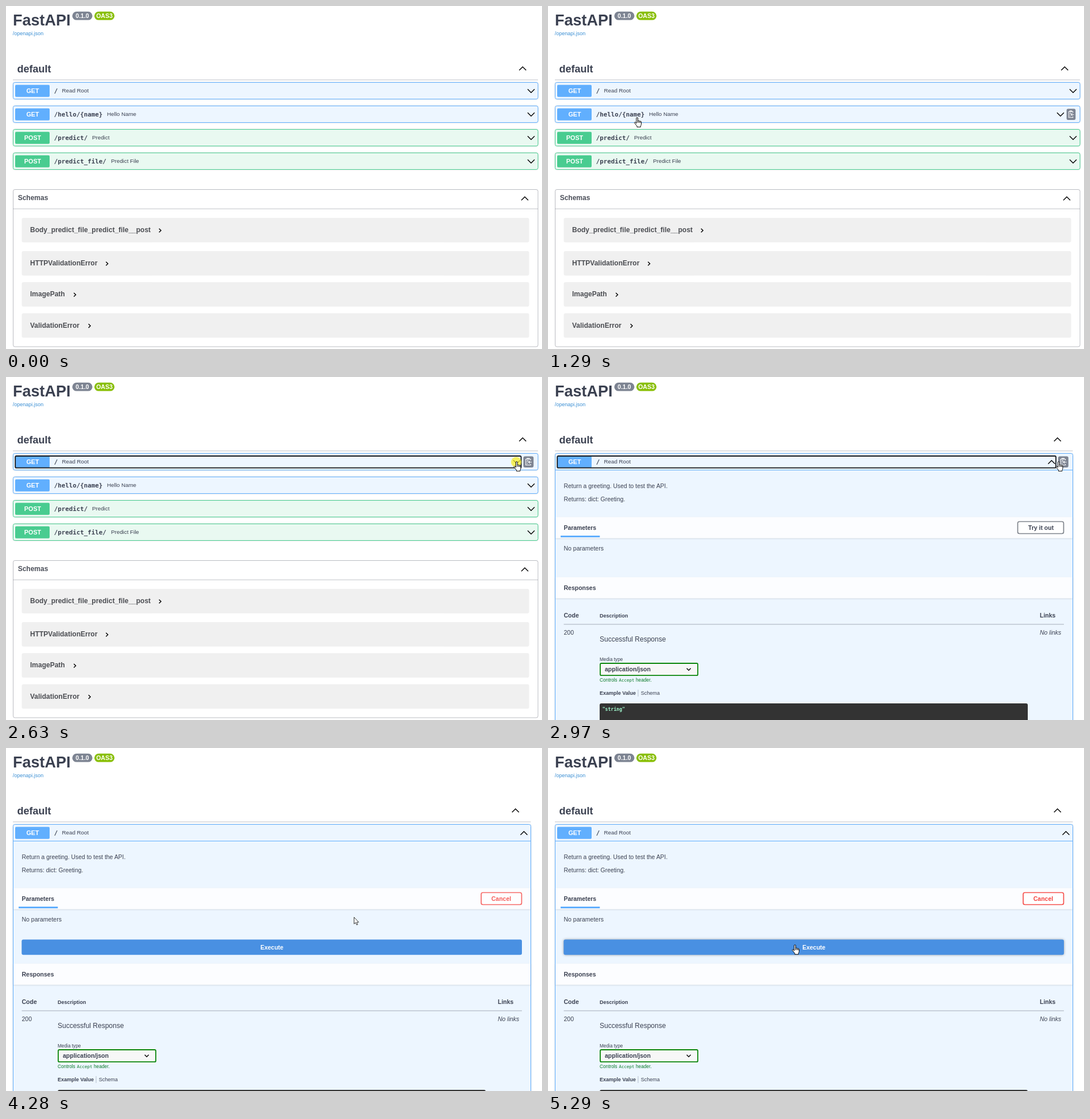
Animation, 934 px wide and 599 px high, one loop 8 s. Source, as an HTML page:

```html
<!DOCTYPE html>
<html lang="en">
<head>
<meta charset="utf-8">
<title>API docs</title>
<style>
html, body { margin: 0; width: 100%; height: 100%; overflow: hidden; background: #fff; }
svg { display: block; width: 934px; height: 599px; }
text { font-family: "Liberation Sans", Arial, sans-serif; font-size: 10.5px; fill: #3b4151; white-space: pre; }
.b { font-weight: 700; }
.mono { font-family: "DejaVu Sans Mono", monospace; }
.mid { text-anchor: middle; }
.white { fill: #fff; }
.green { fill: #0b7a28; }
.chev { fill: none; stroke: #000; stroke-width: 1.4; }
.rule { fill: #3b4151; opacity: .4; }
.line { fill: none; stroke: #3b4151; stroke-opacity: .35; }
.strip { fill: #fcfdff; filter: drop-shadow(0 1px 1px rgba(0, 0, 0, .12)); }
.btn { fill: #fff; stroke-width: 1.7; }
.shade { filter: drop-shadow(0 0 2px rgba(0, 0, 0, .35)); }
.row { filter: drop-shadow(0 0 1px rgba(0, 0, 0, .15)); }
</style>
</head>
<body>
<svg id="stage" viewBox="0 0 934 599"></svg>
<script>
const LOOP = 8000;
const BLUE = '#61affe', GREEN = '#49cc90', GREY = '#7d8492';

const text = (x, y, s, cls = '', size = 10.5, extra = '') =>
  `<text x="${x}" y="${y}" class="${cls}" style="font-size:${size}px;${extra}">${s}</text>`;
const rect = (x, y, w, h, fill, r = 0, extra = '') =>
  `<rect x="${x}" y="${y}" width="${w}" height="${h}" rx="${r}" fill="${fill}" ${extra}/>`;
const group = (id, body) => `<g id="${id}">${body}</g>`;
const chevron = (x, y, up, id = '') =>
  `<path ${id && `id="${id}"`} class="chev" transform="translate(${x} ${y})" d="${up ? 'M-6 3.2L0-2.8 6 3.2' : 'M-6-3.2L0 2.8 6-3.2'}"/>`;

const rows = [
  ['GET', '/', 'Read Root', 97.5],
  ['GET', '/hello/{name}', 'Hello Name', 176],
  ['POST', '/predict/', 'Predict', 150],
  ['POST', '/predict_file/', 'Predict File', 183]
];
const rowY = i => 133.5 + 41 * i;

function rowBox(i, w = 914.5, h = 29) {
  const get = rows[i][0] === 'GET';
  return rect(12.5, rowY(i), w, h, get ? '#edf6ff' : '#e9f9f1', 3,
    `stroke="${get ? BLUE : GREEN}" class="row"`);
}

function rowHead(i) {
  const [verb, path, label, x] = rows[i], y = rowY(i);
  return rect(16, y + 4.3, 60, 21, verb === 'GET' ? BLUE : GREEN, 2) +
    text(46.5, y + 18.6, verb, 'b mid white', 10.8) +
    text(83.7, y + 18.8, path, 'b mono', 10.8) +
    text(x, y + 17.6, label, '', 9.75);
}

const clip = id => `<g id="${id}">${rect(0, 0, 17.8, 19.5, GREY, 3)}
  <g fill="none" stroke="#fff" stroke-width="1.1">
  <path d="M12.6 7V5H4.2V15.3H12.6V13.6M6.3 5V3.6H10.5V5M6 7.6H9M6 9.8H7.6M6 12.6H7.6M14.6 10.2H9M11.2 8L9 10.2 11.2 12.4"/></g></g>`;

const schemas = [
  ['Body_predict_file_predict_file__post', 370, 268.5],
  ['HTTPValidationError', 428, 176],
  ['ImagePath', 482.3, 120],
  ['ValidationError', 536.6, 145.5]
];
const schema = ([name, y, x]) =>
  rect(27.5, y, 884, 42.7, '#f0f0f0', 3) +
  text(42, y + 25, name, 'b', 12, 'fill:#4b4d52') +
  `<path class="chev" d="M${x - 1.8} ${y + 18.7}l3.4 3.3-3.4 3.3"/>`;

const page =
  text(12, 34, 'FastAPI', 'b', 27) +
  rect(115.5, 9.8, 35, 14.8, GREY, 7.4) + text(133, 20.8, '0.1.0', 'b mid white') +
  rect(154, 9.8, 35, 14.8, '#89bf04', 7.4) + text(171.5, 20.8, 'OAS3', 'b mid white') +
  text(11.7, 51, '/openapi.json', '', 9, 'fill:#3b8fd4') +
  text(19.5, 116, 'default', 'b', 18) +
  chevron(900.5, 109, true, 'topChev') +
  rect(12, 128.5, 915, 1, '#3b4151', 0, 'id="topRule" opacity=".32"');

const closed =
  rows.map((_, i) => rowBox(i) + (i ? rowHead(i) : '')).join('') +
  chevron(915, 148.5, false, 'down1') + chevron(915, 189.5, false, 'down2') + clip('clip2') +
  chevron(915, 230.5) + chevron(915, 271.5) +
  '<rect class="line" x="12.5" y="320.5" width="914.5" height="274.5" rx="3"/>' +
  rect(12.5, 353.7, 914.5, 1, '#3b4151', 0, 'opacity=".32"') +
  text(20.7, 339, 'Schemas', 'b', 12, 'fill:#4b4f59') + chevron(904, 336, true) +
  schemas.map(schema).join('');

const responses =
  rect(13, 349.5, 901, 37, '', 0, 'class="strip"') +
  text(27.5, 372, 'Responses', 'b') +
  text(27.5, 420, 'Code', 'b') + text(90, 419.5, 'Description', 'b', 9) + text(857, 420, 'Links', 'b') +
  rect(27.5, 431.4, 871.5, 1, '', 0, 'class="rule"') +
  text(27.5, 449.5, '200') + text(857, 449.5, 'No links', '', 10.5, 'font-style:italic') +
  text(90, 462, 'Successful Response', '', 12) +
  text(90, 496, 'Media type', '', 8.25) +
  rect(91, 500, 170, 21.2, '#f7f7f7', 2, 'stroke="#0b860b" stroke-width="1.8"') +
  text(99, 514, 'application/json', 'b') +
  '<path class="chev" d="M241.7 508.8l3.5 3.4 3.5-3.4"/>' +
  text(90, 532, 'Controls', 'green', 8.25) + text(123.5, 532, 'Accept', 'mono green', 7.5) +
  text(153, 532, 'header.', 'green', 8.25) +
  text(90, 555, 'Example Value', 'b', 9) + rect(156.5, 546, 1, 12, '#3b4151', 0, 'opacity=".3"') +
  text(161.7, 555, 'Schema', '', 9) +
  rect(90, 570, 746, 60, '#333', 3) +
  text(94.7, 582.8, '"string"', 'b mono', 8.2, 'fill:#a2fcd0');

const open =
  rowBox(0, 902, 500) + rect(13, 162, 901, 1, BLUE) +
  text(27.5, 194, 'Return a greeting. Used to test the API.', '', 10.4) +
  text(27.5, 216.5, 'Returns: dict: Greeting.', '', 10.4) +
  rect(13, 244.5, 901, 37, '', 0, 'class="strip"') +
  text(27.5, 266.7, 'Parameters', 'b', 10.4) + rect(22, 277, 68.3, 3, BLUE) +
  text(27.5, 302.5, 'No parameters') +
  group('tryIt',
    rect(818.5, 252.5, 80, 21, '#fff', 3, 'id="tryBox" class="btn" stroke="#7f848c"') +
    text(859, 266.8, 'Try it out', 'b mid')) +
  group('running',
    group('cancel',
      rect(828, 252.5, 70.5, 21, '#fff', 3, 'class="btn" stroke="#f5504c"') +
      text(863, 266.8, 'Cancel', 'b mid', 10.5, 'fill:#f5443f')) +
    rect(27.3, 334.6, 871.7, 26.7, '#4990e2', 3, 'id="exec"') +
    text(463.3, 351.8, 'Execute', 'b mid white')) +
  group('resp', responses) +
  chevron(902.5, 148.5, true, 'up1');

const pointer =
  '<circle id="click" r="9" fill="#f7ee2c" opacity=".75"/>' +
  `<path id="hand" fill="#fff" stroke="#000" stroke-linejoin="round"
    d="M4 11V2a1.3 1.3 0 0 1 2.6 0V7c.5-1 2.1-.8 2.3.3.5-.9 1.9-.6 2 .4.6-.7 1.6-.3 1.6.7v4.1c0 1.5-.9 2.3-1.1 3.2v1.6H5V15.6C4 14 2 12.2.9 10.4c-.7-1.3.8-2.2 1.7-1.3zM6.6 7v3M8.9 7.5V10M10.9 8v2"/>` +
  `<path id="arrow" fill="#fff" stroke="#222" stroke-width=".9"
    d="M.5.5V12.2L3.2 9.8 5 14 6.9 13.2 5.1 9.2H8.6z"/>`;

document.getElementById('stage').innerHTML =
  page + group('closed', closed) + group('open', open) + rowHead(0) + clip('clip1') +
  rect(16.2, 138, 880, 20.7, 'none', 2, 'id="focus" stroke="#15181c" stroke-width="1.8"') + pointer;

// mode: 0 list, 1 operation open, 2 trying it out; h1 and h2: hover amount of the first two rows
const steps = [
  { t: 0 },
  { t: 630, hand: [563, 305] },
  { t: 960, hand: [154, 176] },
  { t: 1290, hand: [150, 194], h2: .88 },
  { t: 1630, hand: [598, 183], h2: 1 },
  { t: 1960, hand: [886, 151], h1: .88, h2: .12 },
  { t: 2300, hand: [885, 149], h1: 1 },
  { t: 2630, hand: [884.5, 147], h1: 1, focus: true, click: true },
  { t: 2970, hand: [884.5, 147], h1: 1, focus: true, mode: 1 },
  { t: 3290, hand: [877, 155], h1: 1, focus: true, mode: 1 },
  { t: 3620, hand: [829, 264], h1: .03, focus: true, mode: 1 },
  { t: 3960, hand: [840, 262], focus: true, mode: 1, click: true, hot: true },
  { t: 4280, arrow: [606, 295], mode: 2, fading: true },
  { t: 4620, hand: [499, 346], mode: 2 },
  { t: 4950, hand: [417, 349], mode: 2 },
  { t: 5290, hand: [425, 343], mode: 2, hot: true }
];

const $ = id => document.getElementById(id);
const show = (id, on) => { $(id).style.display = on ? '' : 'none'; };
const move = (id, x, y, more = '') => $(id).setAttribute('transform', `translate(${x} ${y})${more}`);

function place(id, pos) {
  show(id, pos);
  if (pos) move(id, ...pos);
}

function hover(chev, clipId, y, right, h) {
  move(chev, right - 12 - 25 * h, y);
  show(clipId, h > .05);
  move(clipId, right - 7.7 - 17.8 * h, y - 10, ` scale(${h} 1)`);
}

function draw({ hand, arrow, h1 = 0, h2 = 0, mode = 0, focus, click, hot, fading }) {
  const right = mode ? 914.5 : 927;
  show('closed', !mode);
  show('open', mode);
  show('tryIt', mode === 1);
  show('running', mode === 2);
  move('topChev', right - 26.7, 109);
  $('topRule').setAttribute('width', right - 12);
  hover(mode ? 'up1' : 'down1', 'clip1', 148.5, right, h1);
  hover('down2', 'clip2', 189.5, 927, h2);
  move('resp', 0, mode === 2 ? 27 : 0);
  show('focus', focus);
  $('focus').setAttribute('width', right - 20.6 - 25 * h1);
  $('tryBox').classList.toggle('shade', !!hot);
  $('exec').classList.toggle('shade', !!hot);
  $('cancel').style.opacity = fading ? .85 : 1;
  place('hand', hand);
  place('arrow', arrow);
  place('click', click && [hand[0] + 4.5, hand[1] + 1.5]);
}

let current;
function tick() {
  const t = performance.now() % LOOP;
  const step = steps.findLast(s => s.t <= t);
  if (step !== current) draw(current = step);
  requestAnimationFrame(tick);
}
tick();
</script>
</body>
</html>
```
